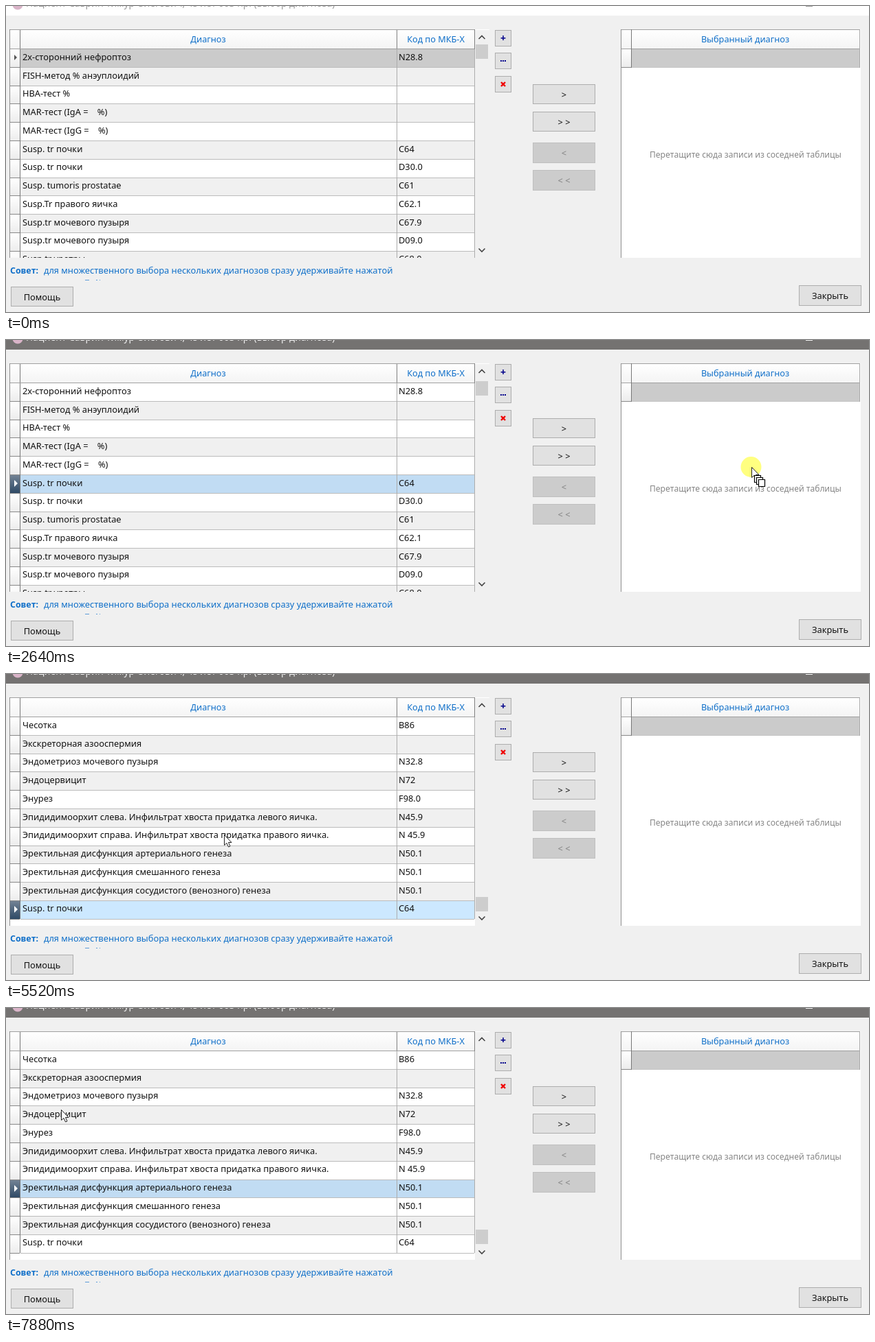
Recreate the animation shown at these times as an HTML page with a canvas. Size 1255 by 446 pixels, loop 8 s.

```html
<!DOCTYPE html>
<html lang="ru">
<head>
<meta charset="utf-8">
<style>
html, body { margin: 0; width: 100%; height: 100%; overflow: hidden; background: #f0f0f0; }
canvas { display: block; }
</style>
</head>
<body>
<canvas id="stage" width="1255" height="446"></canvas>
<script>
const ctx = document.getElementById('stage').getContext('2d');
const LOOP = 8000;
const FONT = '"Noto Sans", "Open Sans", sans-serif';
const BLUE = '#0f6fc9', GRAY = '#cbcbcb', PALE = '#cce8ff', FOCUS = '#c1dcf3';

const topRows = [
  ['2x-сторонний нефроптоз', 'N28.8'],
  ['FISH-метод % анэуплоидий', ''],
  ['НВА-тест %', ''],
  ['MAR-тест (IgA =    %)', ''],
  ['MAR-тест (IgG =    %)', ''],
  ['Susp. tr почки', 'C64'],
  ['Susp. tr почки', 'D30.0'],
  ['Susp. tumoris prostatae', 'C61'],
  ['Susp.Tr правого яичка', 'C62.1'],
  ['Susp.tr мочевого пузыря', 'C67.9'],
  ['Susp.tr мочевого пузыря', 'D09.0'],
  ['Susp.tr уретры', 'C68.0'],
  ['Susp.tr уретры', 'D29.4']
];
const restRows = topRows.filter((row, i) => i !== 5);
const endRows = [
  ['Чесотка', 'B86'],
  ['Экскреторная азооспермия', ''],
  ['Эндометриоз мочевого пузыря', 'N32.8'],
  ['Эндоцервицит', 'N72'],
  ['Энурез', 'F98.0'],
  ['Эпидидимоорхит слева. Инфильтрат хвоста придатка левого яичка.', 'N45.9'],
  ['Эпидидимоорхит справа. Инфильтрат хвоста придатка правого яичка.', 'N 45.9'],
  ['Эректильная дисфункция артериального генеза', 'N50.1'],
  ['Эректильная дисфункция смешанного генеза', 'N50.1'],
  ['Эректильная дисфункция сосудистого (венозного) генеза', 'N50.1'],
  ['Susp. tr почки', 'C64']
];

// Dialog states: fill = row colours, mark = current row, dark = filled row markers
const states = [
  { until: 1280, rows: topRows, fill: { 0: GRAY }, mark: 0, dark: [], thumb: 56, idle: true },
  { until: 2800, rows: topRows, fill: { 5: FOCUS }, mark: 5, dark: [5], thumb: 60 },
  { until: 3720, rows: restRows, fill: { 5: PALE }, mark: 5, dark: [], thumb: 60, chosen: GRAY },
  { until: 5080, rows: restRows, fill: { 5: GRAY }, mark: 5, dark: [], thumb: 60, chosen: PALE },
  { until: 6200, rows: endRows, fill: { 10: PALE }, mark: 10, dark: [10], thumb: 325 },
  { until: 7120, rows: endRows, fill: { 4: PALE, 10: PALE }, mark: 4, dark: [10], thumb: 320 },
  { until: LOOP, rows: endRows, fill: { 7: FOCUS }, mark: 7, dark: [7], thumb: 323 }
];

// Pointer path: time, x, y
const path = [
  [440, 428, 334], [920, 330, 204], [1080, 330, 204], [1280, 202, 203], [1400, 202, 203],
  [1560, 202, 194], [1720, 198, 203], [2000, 198, 203], [2600, 1084, 185], [2720, 1084, 185],
  [2800, 1089, 187], [2880, 1089, 187], [2990, 980, 288], [3100, 804, 220], [3240, 930, 82],
  [3520, 930, 82], [3720, 991, 72], [4080, 991, 72], [4440, 587, 144], [4880, 391, 166],
  [5160, 335, 215], [5520, 317, 234], [5800, 317, 234], [6120, 162, 185], [6280, 162, 185],
  [6600, 87, 229], [6640, 87, 229], [6880, 88, 259], [7240, 88, 259], [7640, 79, 146],
  [7840, 79, 146], [7880, 80, 148], [LOOP, 80, 148]
];
const presses = [[1280, 1400], [2000, 2800], [4080, 5080], [6120, 6240], [7080, 7200]];
const drags = [[2080, 2800], [4160, 5080]];
const within = (spans, t) => spans.some(([a, b]) => t >= a && t < b);

// Position of the grid line above row i
const lineY = i => Math.floor(62.4 + 26.8 * i);

function rect(x, y, w, h, color) {
  ctx.fillStyle = color;
  ctx.fillRect(x, y, w, h);
}

function text(str, x, y, { color = '#111', size = 12.8, align = 'left', weight = '' } = {}) {
  ctx.font = `${weight} ${size}px ${FONT}`;
  ctx.textAlign = align;
  ctx.fillStyle = color;
  ctx.fillText(str, x, y);
}

function shape(points, fill, stroke, width = 1) {
  ctx.beginPath();
  points.forEach(([x, y]) => ctx.lineTo(x, y));
  if (fill) { ctx.closePath(); ctx.fillStyle = fill; ctx.fill(); }
  if (stroke) { ctx.strokeStyle = stroke; ctx.lineWidth = width; ctx.stroke(); }
}

function disc(x, y, r, color) {
  ctx.beginPath();
  ctx.arc(x, y, r, 0, Math.PI * 2);
  ctx.fillStyle = color;
  ctx.fill();
}

function shade(x, y, w, h, from, to) {
  const g = ctx.createLinearGradient(0, y, 0, y + h);
  g.addColorStop(0, from);
  g.addColorStop(1, to);
  rect(x, y, w, h, g);
}

function button(label, x, y, w, h, { off = false, ...style } = {}) {
  rect(x, y, w, h, off ? '#bfbfbf' : '#adadad');
  rect(x + 1, y + 1, w - 2, h - 2, off ? '#cccccc' : '#e1e1e1');
  text(label, x + w / 2, y + h / 2 + 5, { align: 'center', color: off ? '#838383' : '#111', ...style });
}

function marker(x, y, h, dark, arrow) {
  if (dark) shade(x, y, 14, h, '#728294', '#2f4a66');
  else shade(x, y, 14, h, '#ffffff', '#ececec');
  if (arrow) {
    const m = y + 12, r = dark ? 5 : 4;
    shape([[x + 6, m - r], [x + 6 + r, m], [x + 6, m + r]], dark ? '#fff' : '#555');
  }
}

function titleBar(idle) {
  rect(0, 0, 1255, 14, idle ? '#ffffff' : '#747271');
  const color = idle ? '#999' : '#f2f2f2';
  disc(17, -2, 7.5, '#d9b4c8');
  text('Пациент Саврин Тимур Олегович, 45 лет 063 пр. (выбор диагноза)', 29, 1, { color, size: 13.8 });
  rect(1163, 0, 10, 1, color);
  shape([[1224, -3], [1227, 0]], null, color);
  shape([[1235, -3], [1232, 0]], null, color);
}

function header(x, w, label, cx) {
  shade(x, 35, w, 27, '#ffffff', '#f4f4f4');
  text(label, cx, 53, { color: BLUE, align: 'center', size: 12.7 });
}

function leftTable(s) {
  rect(5, 34, 698, 333, '#ffffff');
  header(6, 562, 'Диагноз', 294);
  header(569, 112, 'Код по МКБ-Х', 625);
  ctx.save();
  ctx.beginPath();
  ctx.rect(5, 34, 698, 333);
  ctx.clip();
  s.rows.slice(0, 12).forEach(([name, code], i) => {
    const y = lineY(i) + 1, end = lineY(i + 1), h = end - y;
    rect(21, y, 660, h, s.fill[i] || (i % 2 ? '#f0f0f0' : '#ffffff'));
    marker(6, y, h, s.dark.includes(i), s.mark === i);
    rect(21, end, 660, 1, '#bcbcbc');
    rect(6, end, 14, 1, '#888');
    const base = Math.round(78.9 + 26.75 * i);
    text(name, 24, base);
    text(code, 571, base);
  });
  const bottom = Math.min(367, lineY(s.rows.length));
  for (const x of [568, 681]) {
    rect(x, 34, 1, 29, '#808080');
    rect(x, 63, 1, bottom - 63, '#acacac');
  }
  rect(20, 34, 1, bottom - 34, '#777');
  rect(5, 34, 676, 1, '#a0a0a0');
  rect(5, 62, 676, 1, '#a0a0a0');
  rect(5, 34, 1, 333, '#909090');
  ctx.restore();
  rect(682, 35, 21, 332, '#f0f0f0');
  rect(683, s.thumb, 18, 21, '#cdcdcd');
  shape([[687.5, 48], [692, 43.5], [696.5, 48]], null, '#444', 1.6);
  shape([[687.5, 353.5], [692, 358], [696.5, 353.5]], null, '#444', 1.6);
}

function rightTable(chosen) {
  rect(894, 34, 349, 333, '#ffffff');
  header(895, 347, 'Выбранный диагноз', 1075);
  rect(910, 63, 332, 26, chosen || GRAY);
  marker(895, 63, 26, chosen === PALE, !!chosen);
  rect(894, 34, 348, 1, '#a0a0a0');
  rect(894, 62, 348, 1, '#a0a0a0');
  rect(894, 89, 15, 1, '#888');
  rect(909, 89, 333, 1, '#c4c4c4');
  rect(909, 34, 1, 56, '#777');
  rect(894, 34, 1, 333, '#909090');
  rect(1241, 34, 1, 56, '#a8a8a8');
  if (chosen) text('Susp. tr почки', 913, 79);
  else text('Перетащите сюда записи из соседней таблицы', 1075.5, 221, { color: '#858585', size: 12, align: 'center' });
}

function controls(chosen) {
  button('+', 711, 35, 24, 24, { color: '#00008b', weight: 'bold', size: 14 });
  button('', 711, 68, 24, 24);
  for (let i = 0; i < 3; i++) rect(719 + i * 3, 79, 2, 2, '#00008b');
  button('', 711, 102, 24, 24);
  shape([[720, 111], [726, 117]], null, '#f00000', 2.4);
  shape([[726, 111], [720, 117]], null, '#f00000', 2.4);
  [['>', 114], ['> >', 154], ['<', 199], ['< <', 239]].forEach(([label, y], i) =>
    button(label, 766, y, 91, i < 2 ? 29 : 30, { off: i > 1 && !chosen }));
  text('Совет:', 6, 390, { color: BLUE, weight: 'bold', size: 12.4 });
  text('для множественного выбора нескольких диагнозов сразу удерживайте нажатой', 55, 390, { color: BLUE });
  rect(115, 399, 6, 1, '#5b9bd8');
  rect(131, 399, 2, 1, '#5b9bd8');
  rect(136, 399, 1, 1, '#5b9bd8');
  button('Помощь', 7, 409, 91, 29);
  button('Закрыть', 1153, 407, 91, 30);
  if (chosen) button('Выбрать', 1053, 407, 91, 30);
}

function pointerAt(t) {
  const i = path.findIndex(p => p[0] > t);
  const [t0, x0, y0] = path[i - 1], [t1, x1, y1] = path[i];
  const k = (t - t0) / (t1 - t0), e = k * k * (3 - 2 * k);
  return [Math.round(x0 + (x1 - x0) * e), Math.round(y0 + (y1 - y0) * e)];
}

function pointer(t) {
  if (t < path[0][0]) return;
  const [x, y] = pointerAt(t);
  if (within(presses, t)) {
    ctx.globalCompositeOperation = 'multiply';
    disc(x - 0.5, y, 15, '#ffff80');
    ctx.globalCompositeOperation = 'source-over';
  }
  ctx.save();
  ctx.translate(x + 0.5, y + 0.5);
  shape([[0, 0], [0, 15], [3.5, 12], [6, 17.5], [8.5, 16.5], [6, 11], [10.5, 11], [0, 0]], '#fff', '#222');
  if (within(drags, t)) {
    for (const d of [0, 3, 6]) {
      shape([[4 + d, 12 + d], [13 + d, 12 + d], [13 + d, 22 + d], [4 + d, 22 + d], [4 + d, 12 + d]], '#fff', '#000', 1.2);
    }
  }
  ctx.restore();
}

function draw(now) {
  const t = now % LOOP;
  const s = states.find(state => t < state.until);
  rect(0, 0, 1255, 446, '#f0f0f0');
  titleBar(s.idle);
  leftTable(s);
  rightTable(s.chosen);
  controls(s.chosen);
  pointer(t);
}

const start = performance.now();
function tick() {
  draw(performance.now() - start);
  requestAnimationFrame(tick);
}
tick();
</script>
</body>
</html>
```
